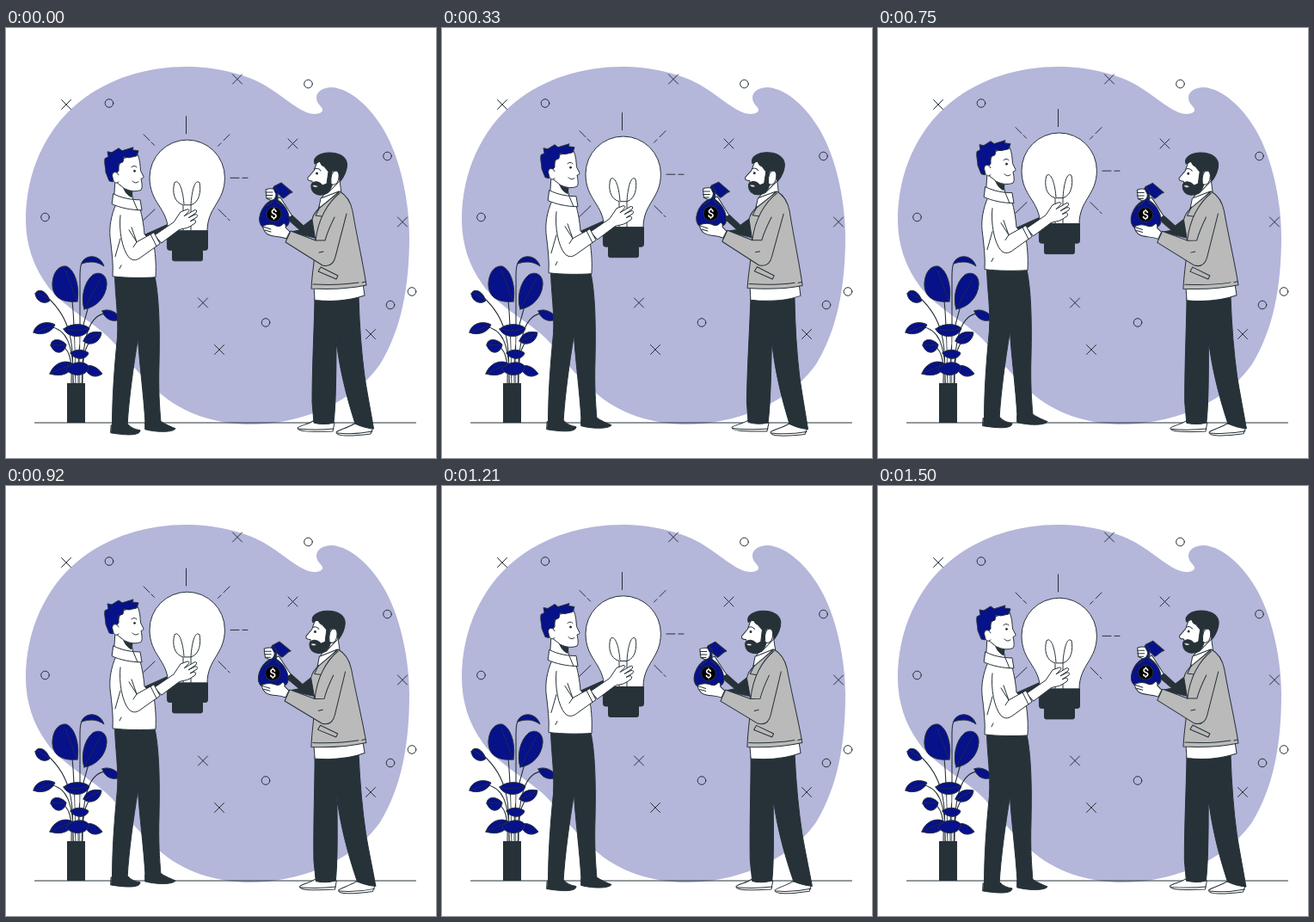
Animation of 500 by 500 pixels, one loop 1.54 s. Source, as an HTML page:

```html
<!DOCTYPE html>
<html lang="en">
<head>
<meta charset="utf-8">
<title>Idea for money</title>
<style>
html, body { margin: 0; width: 100%; height: 100%; overflow: hidden; background: #fff; }
svg { display: block; width: 100vw; height: 100vh; }
path, circle, rect { stroke: #263238; stroke-linecap: round; stroke-linejoin: round; }
.line { fill: none; }
.white { fill: #fff; }
.navy { fill: #07118a; }
.dark { fill: #263238; }
.gray { fill: #bababa; }
.blob { fill: #b4b6da; stroke: none; }
</style>
</head>
<body>
<svg viewBox="0 0 500 500">
  <path class="blob" d="M23 223C23 168 46 118 84 87C120 58 164 45 210 45C240 45 275 52 300 66C320 78 334 91 347 97C355 101 366 101 368 96C369 92 361 89 361 81C361 74 368 69 379 69C402 71 424 93 439 118C458 150 469 200 469 243C469 300 460 350 435 391C402 438 340 461 283 461C255 461 213 453 182 427C158 406 146 392 128 369C108 344 66 326 47 298C31 276 23 250 23 223Z"/>
  <g id="marks" class="line"></g>
  <path class="line" d="M33.5 459H476.5"/>

  <g id="plant">
    <path class="line" stroke-width="1.1" d="M81 413C79 380 82 350 74 287M84 413C83 375 86 345 107 294M86 413V290C86 278 87 272 92 269M78 413C78 370 78 340 48 313M79 413C78 365 70 350 50 347M88 413C89 360 96 330 120 332M76 413C77 385 74 372 62 368M89 413C89 385 90 370 102 360"/>
    <path class="line" style="stroke:#fff" stroke-width="1.4" d="M82.500 412V350M79.500 412L78.500 360M87 412V350"/>
    <g class="navy">
      <path d="M83 318C64 320 53 312 54 296C55 283 62 276 70 277C80 281 86 300 83 318Z"/>
      <path d="M91 327C87 315 90 296 101 287C110 282 118 288 117 299C116 313 105 325 91 327Z"/>
      <path d="M88 274C91 263 109 262 114 277C106 271 97 271 88 274Z"/>
      <path d="M34 309C36 303 46 303 51 317C46 322 35 319 34 309Z"/>
      <path d="M32 354C33 345 46 339 57 345C53 355 40 358 32 354Z"/>
      <path d="M112 329C118 326 128 329 134 338C126 343 115 340 112 329Z"/>
      <path d="M67 350C75 343 90 343 97 349C94 361 72 362 67 350Z"/>
      <path d="M90 364C93 354 102 352 111 354C110 366 97 371 90 364Z"/>
      <path d="M52 369C52 361 63 360 70 368C69 378 57 382 52 369Z"/>
      <path d="M75 378C80 373 90 373 96 378C94 386 80 387 75 378Z"/>
      <path d="M51 402C55 390 68 385 77 390C78 400 66 407 51 402Z"/>
      <path d="M91 394C98 390 106 394 112 402C104 408 95 405 91 394Z"/>
      <path d="M70 397C75 388 90 386 96 393C97 404 78 408 70 397Z"/>
    </g>
    <path class="line" stroke-width=".7" d="M82 316L69 282M92 325L110 291M68 350Q82 354 96 349M36 353L55 346M53 401L76 391M37 308L50 316M54 368L68 369M92 364L110 355"/>
    <rect class="dark" x="71" y="413" width="21" height="46" stroke="none" style="stroke:none"/>
  </g>

  <g id="inventor">
    <path class="line" d="M209.500 103V123M160 124L167 131M169 133L172.500 136.500M260 124L253 131M250 134L246.500 137.500M261 174.500H271M275 174.500H281M159.500 224L173 211M247 211L256 220M258 222L260 224"/>
    <path class="white" d="M188.500 236C188 209 167 204 167 174A43.700 43.700 0 0 1 254.400 174C254.400 203 234 208 234 236Z"/>
    <path class="line" d="M206 236V206C195 203 193 190 196 180C201 175 206 189 207 206H215C216 189 220 175 225 180C227 190 225 203 215 206V236"/>
    <path class="dark" d="M187.500 236H234.500V256Q234.500 258.500 232 258.500H228.500V269Q228.500 271 226.500 271H195.500Q193.500 271 193.500 269V258.500H190Q187.500 258.500 187.500 256Z"/>
    <path class="dark" d="M158 242L187 229L188 235L165 250Z"/>

    <path class="dark" d="M122.500 462L142 461C145 465 150 467 156 468C156 473 146 475 122 471Z"/>
    <path class="dark" d="M162 459L179 457C185 461 192 464 197 466C195 470 178 471 162 467Z"/>
    <path class="dark" d="M126.500 288C127 312 131 335 129.500 360C126 395 123.500 430 123.500 464L141 463C143 430 148 395 153.500 361C155 390 160 425 162 460L180 459C178.500 440 177 420 178 390C179 350 178 310 172.500 287Z"/>

    <path class="white" d="M127 176L125.500 200L149 206L146 191L142 188Z"/>
    <path class="dark" d="M137 187L147 190L146 197C142 195 139 192 137 187Z"/>
    <path class="white" d="M127 178C128 168 131 158 136 152L153 147C156 154 156 160 156.500 166L160 173C160 175 158 175 157 175.500C158 180 159 186 157 188.500C151 191 144 190 138 187Z"/>
    <path class="navy" d="M124 179L120 178L116 168C116 162 114 158 115 152L119 150L118 144L123 145L131 140L135 143L148 139L147 142L154 143L152 149L143 151L137 150L136 156L131 158L131 166L128 170Z"/>
    <path class="white" d="M131 171C128 165 122 168 124 174C125 180 128 182 131 179"/>
    <path class="line" d="M146 162Q149 159 152 162M147 178Q150 182 154 179"/>
    <circle class="dark" cx="149.500" cy="166.500" r="1"/>

    <path class="white" d="M128 205C122 218 120 232 121 243C123 260 125 275 124 289C140 291 160 291 174 290C175 272 173 260 172 252L161 240C160 228 158 218 156 211Z"/>
    <path class="white" d="M125 193C134 198 146 200 156 200L158 212C145 212 132 209 123.500 205Z"/>
    <path class="white" d="M173 241L195 226L203 214L211 211Q214 211 212 214L207 219L219 212Q223 211 221 215L212 221L220 217Q224 217 222 220L214 225L219 223Q222 224 220 227L214 231C209 234 205 233 201 235L181 250Z"/>
    <path class="white" d="M133 218C131 235 135 258 143 267C148 272 153 270 158 266L179 251L172 238L152 249L146 232"/>
    <path class="line" d="M168 240L175 254M152 249L148 255M127 266L133 245M143 235L152 249M132 280L134 276M148 200L153 212"/>
  </g>

  <g id="investor">
    <path class="white" d="M357 457C351 461 342 462 339 465C339 469 350 470 380 469L382 459Z"/>
    <path class="white" d="M405 460C398 465 387 467 384 470C384 475 400 475 424 472L427 464Z"/>
    <path class="line" d="M340 466Q360 468 381 466M385 471Q405 473 426 469"/>
    <path class="dark" d="M359 314C358.500 350 356 390 356 435L358 459Q369 462 381 459C384 435 384 400 384 362C388 400 397 432 406 460Q416 465 427.500 466C424 445 420 425 417 405C413 375 411 345 410 313Z"/>
    <path class="white" d="M358 301L359 316.500C378 318.500 400 317 417 311L415 297Z"/>

    <path class="white" d="M312 199L328 221L333 219L319 197Z"/>
    <path class="dark" d="M327 222L333 218L346 230L359 220L367 246L331 237L342 235Z"/>
    <path class="white" d="M375 187L388 177L390 192L371 214L363 211L368 196Z"/>
    <path class="white" d="M364 208L366 198L374 195L387 190L366 211Z"/>
    <path class="gray" d="M388 190C397 195 401 203 403 213C408 243 415 272 419 299C400 303 375 304 355 303C356 282 360 264 360 248L356 223C357 216 361 212 366 208Z"/>
    <path class="gray" d="M396 216L383 266C381 274 376 278 368 276L325 249L331 236L360 247L371 247C374 236 378 228 382 220"/>
    <path class="line" d="M388 192C374 203 363 222 360 247M365 208L360 218L367 219M357 298C377 299 397 298 410 296M414 296L418 295M363 283L366 278L386 288L384 292ZM364 261L369 260"/>

    <path class="white" d="M362 155L358 166L351 174C350 177 353 178 356 178L358 191L374 192L388 178L384 158Z"/>
    <path class="dark" d="M359 158C356 150 366 145 376 145C390 145 397 152 396.500 160C396 168 392 174 389 178L386 166C380 164 377 168 379 172L380 180C378 188 374 194 367 194C360 195 354 190 355 182C358 177 364 178 368 183L373 181L375 167L370 161C367 160 366 158 365 155Z"/>
    <path class="white" d="M378 181C377 173 379 166 384 166C388 167 388 175 385 180C383 182 380 183 378 181Z"/>
    <path class="white" stroke-width=".6" d="M356 183Q359 182 363 184Q359 187 356 183Z"/>
    <path class="line" d="M359 164Q363 162 366 166"/>
    <circle class="dark" cx="361.500" cy="169" r="1"/>

    <path class="navy" d="M309 200C310 194 308 188 312 184L320 180L333 191C328 192 326 197 322 198L316 192L316 200C326 207 331 218 329 227C326 235 307 235 299 232C290 225 296 207 309 200Z"/>
    <path class="line" d="M316 192L314 201M312 184L317 191M303 207L310 202M321 207L315 202"/>
    <circle cx="311.500" cy="216.500" r="8.500" fill="#000"/>
    <text x="311.500" y="221.500" text-anchor="middle" fill="#fff" font-size="14" font-weight="500" font-family="Roboto, sans-serif">$</text>
    <path class="white" d="M302 188Q306 186 311 187L314 193C314 198 311 201 307 200L303 198Z"/>
    <path class="line" d="M302 191H310M302 194.500H310M303 198H309"/>
    <path class="white" d="M299 230Q305 227 312 229C318 232 320 230 323 227Q326 228 325 232L330 237L326 245C317 241 310 244 303 239Q298 234 299 230Z"/>
    <path class="line" d="M299 231L308 234M301 235L308 237"/>
  </g>
</svg>
<script>
const LOOP = 1540, STEPS = 37;
const byId = id => document.getElementById(id);
const rings = [[120, 87.5], [351.5, 65], [443.5, 149], [45.5, 220], [302, 342.5], [447, 322], [472, 306.5]];
const crosses = [[70, 89], [269, 59.5], [333.5, 134.5], [461, 225.5], [229, 319.5], [248, 374], [424, 356]];
byId('marks').innerHTML =
  rings.map(([x, y]) => `<circle cx="${x}" cy="${y}" r="4.800"/>`).join('') +
  crosses.map(([x, y]) => `<path d="M${x - 5.5} ${y - 5.5}l11 11m0-11l-11 11"/>`).join('');

const inventor = byId('inventor'), investor = byId('investor');

function draw(now) {
  const step = Math.floor((now % LOOP) / LOOP * STEPS + 0.15);
  const phase = 2 * Math.PI * (step / STEPS + 0.035);
  const lift = 4.15 * (Math.cos(phase) - 1) - 0.1;
  const tilt = 0.93 * Math.sin(phase) - 0.2;
  inventor.setAttribute('transform', `translate(0 ${lift})`);
  investor.setAttribute('transform', `rotate(${tilt} 387 308)`);
}

function tick() {
  draw(performance.now());
  requestAnimationFrame(tick);
}
tick();
</script>
</body>
</html>
```
